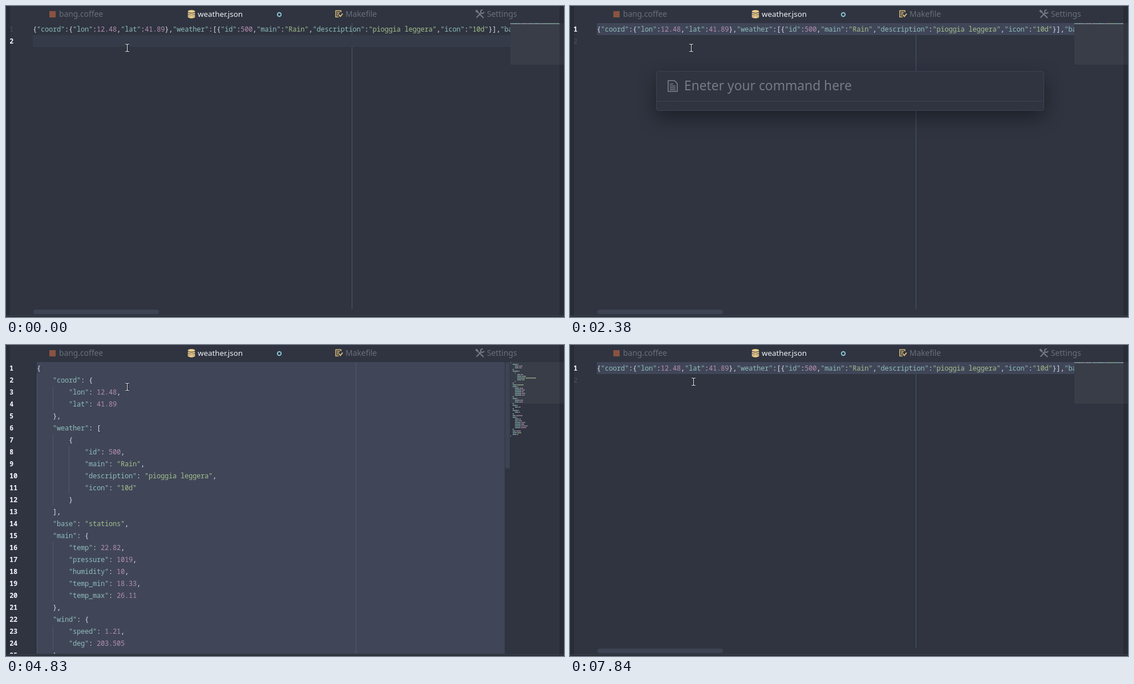
These frames come from a looping animation (978 by 546 pixels, 8000 ms). An HTML page with a canvas:

```html
<!DOCTYPE html>
<html lang="en">
<head>
<meta charset="utf-8">
<title>Editor: reformat JSON</title>
<style>
html, body { margin: 0; width: 100%; height: 100%; overflow: hidden; background: #2f3440; }
#stage { position: absolute; left: 0; top: 0; width: 978px; height: 546px; overflow: hidden; background: #2f3440; }
#stage div, #stage svg, #stage canvas { position: absolute; }
[hidden] { display: none; }
.ui { font-family: "Noto Sans", "Open Sans", sans-serif; white-space: pre; }
.tab { top: 0; line-height: 28px; font-size: 13.8px; color: #696f7b; }
.edge { top: 0; width: 7px; height: 546px; background: #282c36; }
.code { font: 12px/21px "Noto Sans Mono", "DejaVu Sans Mono", monospace; letter-spacing: -.2px; white-space: pre; color: #d8dee9; }
.key { color: #8fbcbb; }
.str { color: #a3be8c; }
.num { color: #b48ead; }
.no { color: #4a5160; }
.no.on { color: #f4f6fa; font-weight: 700; }
.sel { background: #404658; }
.guide { width: 1px; background: #4b566c; }
.indent { width: 1px; height: 21px; background: #50586b; }
.caret { width: 2px; background: #eceff4; }
.scroll { background: #3d4352; border-radius: 4px; }
.view { left: 884px; top: 30px; width: 94px; height: 73px; background: rgba(255,255,255,.045); }
#modal { left: 151px; top: 114px; width: 678px; height: 68px; border: 1px solid #3c4251; border-radius: 4px;
  background: #2f3440; box-shadow: 0 12px 32px rgba(0,0,0,.4); }
#rule { left: 0; top: 52px; width: 678px; height: 1px; background: #3c4251; }
.big { left: 48px; top: 9px; line-height: 32px; }
#hint { font-size: 22.8px; color: #747a86; }
#typed { font-size: 23.5px; color: #f0f3f8; }
</style>
</head>
<body>
<div id="stage">
  <div id="single">
    <div class="guide" style="left:606px;top:30px;height:502px"></div>
    <div id="active" style="left:47px;top:51px;width:837px;height:21px;background:#353b48"></div>
    <div id="picked" class="sel" style="left:47px;top:30px;width:837px;height:21px"></div>
    <div id="long" class="code" style="left:47px;top:30px;width:837px;height:21px;overflow:hidden"></div>
    <div id="no1" class="code no" style="left:6px;top:30px">1</div>
    <div id="no2" class="code no" style="left:6px;top:51px">2</div>
    <div id="caret" class="caret" style="left:47px;top:51px;height:21px"></div>
    <div class="scroll" style="left:48px;top:533px;width:220px;height:8px"></div>
  </div>
  <div id="multi" style="left:0;top:0;width:978px;height:542px;overflow:hidden">
    <div class="sel" style="left:54px;top:30px;width:820px;height:512px"></div>
    <div class="guide" style="left:613px;top:30px;height:512px;background:#50586b"></div>
    <div class="scroll" style="left:875px;top:30px;width:8px;height:187px"></div>
  </div>
  <div class="edge" style="left:0"></div>
  <div class="edge" style="left:970px;width:8px"></div>
  <div class="view"></div>
  <canvas id="mapSingle" width="86" height="140" style="left:884px;top:30px"></canvas>
  <canvas id="mapMulti" width="86" height="140" style="left:884px;top:30px"></canvas>
  <div style="left:0;top:543px;width:978px;height:3px;background:#2a2e38;border-top:1px solid #3a404d;box-sizing:border-box"></div>

  <div class="ui tab" style="left:93px">bang.coffee</div>
  <div class="ui tab" style="left:336px;font-size:13.3px;color:#f0f3f8">weather.json</div>
  <div class="ui tab" style="left:595px">Makefile</div>
  <div class="ui tab" style="left:843px">Settings</div>
  <svg width="978" height="30" style="left:0;top:0" fill="none">
    <rect x="76" y="9" width="11" height="11" fill="#8b5340"/>
    <g fill="#ebcb8b">
      <ellipse cx="325" cy="9.5" rx="6.3" ry="2.5"/>
      <path id="disc" d="M318.7 11.5q6.3 3 12.6 0v2.2q-6.3 4-12.6 0z"/>
      <use href="#disc" y="3.2"/>
      <use href="#disc" y="6.1"/>
    </g>
    <circle cx="479" cy="15" r="3.2" stroke="#88c0d0" stroke-width="2"/>
    <g stroke="#d9b978" stroke-width="1.6">
      <path d="M587 11V8.2H578V19.2H583M580 11.3h5M580 13.7h4M580 16.2h2"/>
      <path d="M583.5 15.5l2.5 2.8 4-5" stroke-width="2"/>
    </g>
    <g stroke="#727884" stroke-width="2.2">
      <path d="M828 12l9 9M824.5 20.5l8-8"/>
      <path d="M823.5 7.5l4 4" stroke-width="3.4"/>
      <path d="M835.6 7a3 3 0 1 0 2.2 3.6" stroke-width="2"/>
    </g>
  </svg>

  <div id="modal">
    <div id="rule"></div>
    <svg width="20" height="24" style="left:18px;top:14px" fill="none" stroke="#7b818d" stroke-width="1.6">
      <path d="M2 2h11l5 5v14H2zM5 8h6M5 11.5h10M5 14.7h10M5 18h10"/>
    </svg>
    <div id="hint" class="ui big">Eneter your command here</div>
    <div id="typed" class="ui big"></div>
    <div id="bar" class="caret" style="top:10px;height:32px"></div>
  </div>

  <svg id="mouse" width="11" height="17" style="left:0;top:0" fill="none">
    <path id="beam" d="M2 2h2.3l1.2 1 1.2-1H9M5.5 2.5v12M2 15h2.3l1.2-1 1.2 1H9" stroke="#14171d" stroke-width="3"/>
    <path d="M2 2h2.3l1.2 1 1.2-1H9M5.5 2.5v12M2 15h2.3l1.2-1 1.2 1H9" stroke="#f4f6fa" stroke-width="1.1"/>
  </svg>
</div>
<script>
const LOOP = 8000;
const $ = id => document.getElementById(id);
const data = {
  coord: { lon: 12.48, lat: 41.89 },
  weather: [{ id: 500, main: "Rain", description: "pioggia leggera", icon: "10d" }],
  base: "stations",
  main: { temp: 22.82, pressure: 1019, humidity: 10, temp_min: 18.33, temp_max: 26.11 },
  wind: { speed: 1.21, deg: 203.505 },
  rain: { "3h": 0.25 },
  clouds: { all: 32 },
  dt: 1438006321,
  sys: { type: 3, id: 58391, message: 0.0089, country: "IT", sunrise: 1437969345, sunset: 1438021987 },
  id: 3169070,
  name: "Rome",
  cod: 200
};
const colors = { key: "#8fbcbb", str: "#a3be8c", num: "#b48ead", "": "#d8dee9" };

function tokens(line) {
  const parts = line.match(/"[^"]*"|[\d.]+|\s+|[{}[\],:]/g);
  return parts.map((text, i) => {
    let kind = "";
    if (text[0] === '"') kind = parts[i + 1] === ":" ? "key" : "str";
    else if (/\d/.test(text)) kind = "num";
    return { text, kind };
  });
}

function add(parent, cls, x, y, text = "") {
  const el = document.createElement("div");
  el.className = cls;
  el.style.left = x + "px";
  el.style.top = y + "px";
  el.textContent = text;
  parent.append(el);
  return el;
}

function paint(el, line) {
  for (const { text, kind } of tokens(line)) {
    const span = document.createElement("span");
    span.className = kind;
    span.textContent = text;
    el.append(span);
  }
}

function drawMap(canvas, lines) {
  const g = canvas.getContext("2d");
  lines.forEach((line, row) => {
    let x = 0;
    for (const { text, kind } of tokens(line)) {
      g.fillStyle = colors[kind];
      g.globalAlpha = kind ? .6 : .5;
      if (text.trim()) g.fillRect(x, row * 3, text.length, 2);
      x += text.length;
    }
  });
}

const compact = JSON.stringify(data);
const lines = JSON.stringify(data, null, 4).split("\n");
paint($("long"), compact);
drawMap($("mapSingle"), [compact]);
drawMap($("mapMulti"), lines);
lines.slice(0, 25).forEach((line, i) => {
  const y = 30 + i * 21;
  const depth = line.search(/\S/) / 4;
  for (let d = 0; d < depth; d++) add($("multi"), "indent", 54 + d * 28, y);
  paint(add($("multi"), "code", 54, y), line);
  add($("multi"), "code no on", i < 9 ? 13 : 6, y, i + 1);
});
// single-digit numbers share the left column
document.querySelectorAll("#multi .no").forEach(el => el.style.left = "6px");

// [start ms, value]
const typing = [[0, ""], [3570, "j"], [3780, "js"], [4130, "json_reformat"]];
const blink = [[0, false], [2590, true], [3010, false], [3430, true]];
const path = [[0, [212, 73]], [7280, [212, 72]], [7350, [213, 69]], [7420, [214, 65]],
  [7490, [215, 61]], [7560, [215, 60]], [7630, [215, 62]], [7840, [216, 64]]];
const at = (steps, t) => steps.filter(s => s[0] <= t).pop()[1];
const show = (id, on) => { $(id).style.display = on ? "" : "none"; };

function render(t) {
  const picked = t >= 700;
  const multi = t >= 4830 && t < 6020;
  show("single", !multi);
  show("mapSingle", !multi);
  show("multi", multi);
  show("mapMulti", multi);
  show("active", !picked);
  show("picked", picked);
  show("caret", t >= 420 && t < 700);
  $("no1").classList.toggle("on", picked);
  $("no2").classList.toggle("on", !picked);

  show("modal", t >= 2380 && t < 4830);
  const text = at(typing, t);
  show("hint", !text);
  $("typed").textContent = text;
  show("bar", at(blink, t));
  $("bar").style.left = 48 + Math.round($("typed").offsetWidth) + "px";

  const [x, y] = at(path, t);
  $("mouse").style.transform = `translate(${x - 5}px, ${y - 8}px)`;
}

const start = performance.now();
function tick() {
  render((performance.now() - start) % LOOP);
  requestAnimationFrame(tick);
}
render(0);
requestAnimationFrame(tick);
</script>
</body>
</html>
```
